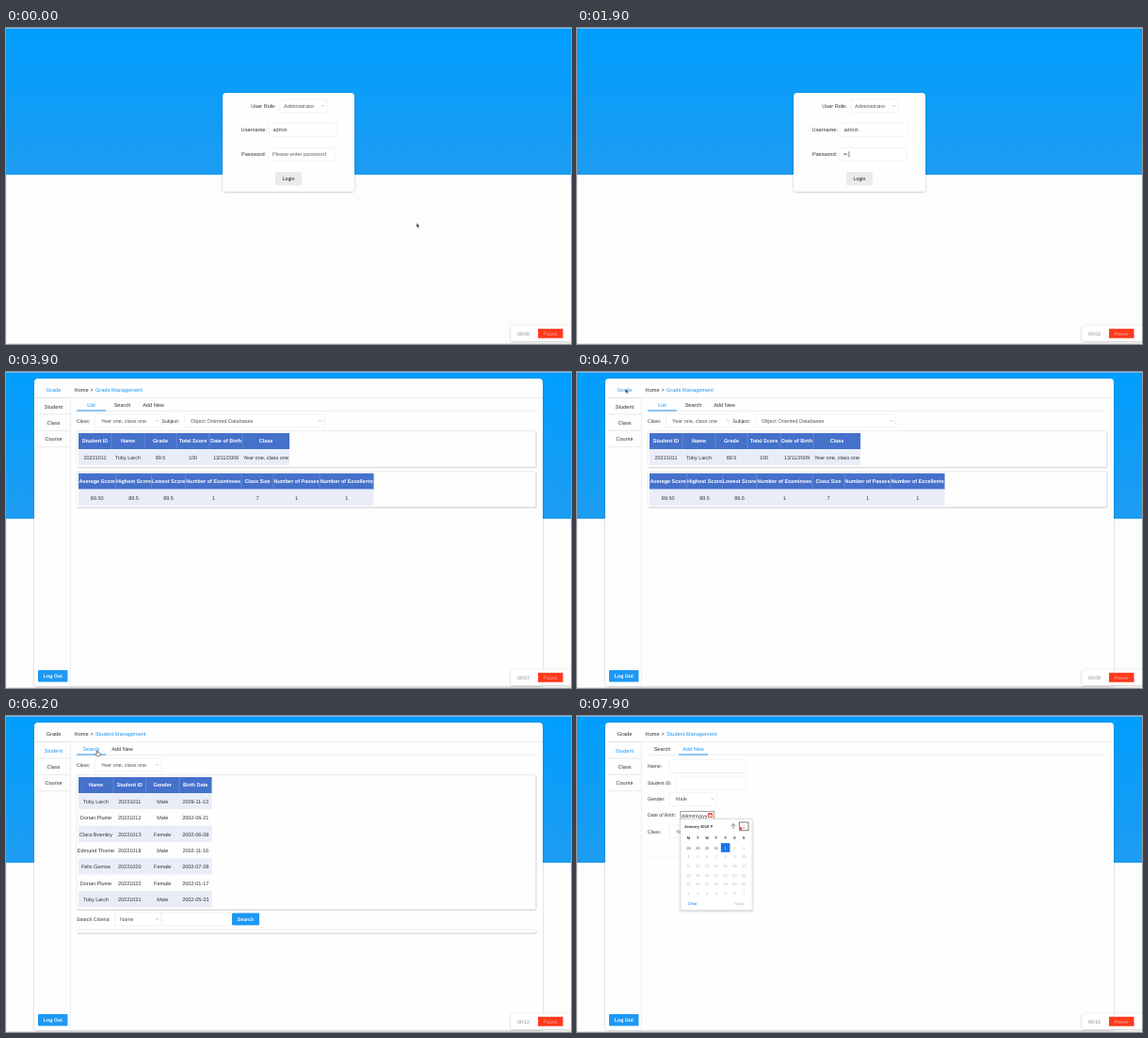
Animation of 600 by 336 pixels, one loop 8 s. Source, as an HTML page:

```html
<!DOCTYPE html>
<html lang="en">
<head>
<meta charset="utf-8">
<title>Grade system walkthrough</title>
<style>
  html, body { margin: 0; width: 100%; height: 100%; overflow: hidden; background: #fdfdfe; }
  svg { display: block; width: 100vw; height: 100vh; }
  text { font-family: "Liberation Sans", Arial, sans-serif; text-rendering: geometricPrecision; white-space: pre; }
</style>
</head>
<body>
<svg id="stage" viewBox="0 0 600 336" preserveAspectRatio="none">
  <defs>
    <linearGradient id="sky" x1="0" y1="0" x2="0" y2="1">
      <stop offset="0" stop-color="#009eff"/>
      <stop offset="1" stop-color="#1d9cf2"/>
    </linearGradient>
    <filter id="soft" x="-10%" y="-20%" width="120%" height="150%">
      <feDropShadow dx="0" dy="0.6" stdDeviation="1" flood-color="#000" flood-opacity="0.25"/>
    </filter>
  </defs>
</svg>
<script>
const LOOP = 8000, STEP = 100;
const BLUE = '#1e98f3', INK = '#333', EDGE = '#ececee', HEAD = '#4571cb', BAND = '#e9edf7';
const stage = document.getElementById('stage');

// ---- drawing helpers ----
function el(parent, tag, attrs, content) {
  const node = document.createElementNS('http://www.w3.org/2000/svg', tag);
  for (const key in attrs) node.setAttribute(key, attrs[key]);
  if (content !== undefined) node.textContent = content;
  return parent.appendChild(node);
}
const group = () => el(stage, 'g', {});
const box = (g, x, y, x2, y2, fill, more) =>
  el(g, 'rect', { x, y, width: x2 - x, height: y2 - y, fill, ...more });
const line = (g, x1, y1, x2, y2, stroke = EDGE, width = 0.7) =>
  el(g, 'line', { x1, y1, x2, y2, stroke, 'stroke-width': width });
const label = (g, x, y, s, more) =>
  el(g, 'text', { x, y, 'font-size': 5.6, fill: INK, ...more }, s);
const centred = (g, x, y, s, more) => label(g, x, y, s, { 'text-anchor': 'middle', ...more });
const field = (g, x, y, x2, y2) => box(g, x, y, x2, y2, '#fff', { rx: 1, stroke: EDGE, 'stroke-width': 0.7 });

function select(g, x, y, x2, value, textX) {
  field(g, x, y, x2, y + 14);
  label(g, textX, y + 9, value, { 'font-size': 5.5, fill: '#555' });
  el(g, 'path', { d: `M${x2 - 6} ${y + 6}l1.6 1.6l1.6 -1.6`, fill: 'none', stroke: '#aaa', 'stroke-width': 0.6 });
}

function button(g, x, y, x2, y2, s) {
  box(g, x, y, x2, y2, BLUE, { rx: 1 });
  centred(g, (x + x2) / 2, (y + y2) / 2 + 1.9, s, { 'font-size': 5.2, fill: '#fff', 'font-weight': 'bold' });
}

function panel(g, y, y2) {
  box(g, 75, y, 563, y2, '#fefefe', { rx: 1.5, stroke: '#e2e2e6', 'stroke-width': 0.6 });
  line(g, 76, y2 + 0.2, 562.5, y2 + 0.2, '#c9c9cf', 0.8);
  line(g, 563, y + 1, 563, y2, '#d5d5da', 0.8);
}

function table(g, top, edges, heads, rows) {
  const last = edges[edges.length - 1], rowH = 17.35;
  const mid = i => (edges[i] + edges[i + 1]) / 2;
  box(g, edges[0], top, last, top + 17, HEAD);
  heads.forEach((s, i) => {
    if (i) line(g, edges[i], top, edges[i], top + 17, '#7f9ddd', 0.5);
    centred(g, mid(i), top + 10.4, s, { 'font-size': 5.5, fill: '#fff', 'font-weight': 'bold' });
  });
  rows.forEach((row, r) => {
    const y = top + 17 + r * rowH;
    box(g, edges[0], y, last, y + rowH, r % 2 ? '#fdfdfe' : BAND);
    row.forEach((s, i) => centred(g, mid(i), y + 10.8, s, { 'font-size': 5.5 }));
  });
}

// tabs: [centre, name], underline spans the active one
function tabs(g, list, active) {
  line(g, 75, 41.3, 563, 41.3, '#e6e6ea');
  list.forEach(([x, s], i) => centred(g, x, 36.6, s, { fill: i === active ? BLUE : INK }));
  const x = list[active][0];
  line(g, x - 15.5, 41, x + 15.5, 41, BLUE, 1);
}

function crumb(g, title, item, y) {
  label(g, 95, 21, title, { fill: BLUE });
  box(g, 36, y - 7, 66, y + 3, '#fefefe');
  centred(g, 50.5, y, item, { fill: BLUE });
}

// ---- backdrop ----
const back = group();
box(back, 0, 0, 600, 336, '#fdfdfe');
box(back, 0, 0, 600, 156, 'url(#sky)');
line(back, 0, 0.3, 600, 0.3, '#a9cfe8', 0.7);
line(back, 0.3, 156, 0.3, 336, '#dcdce0', 0.6);
line(back, 0, 335.6, 600, 335.6, '#dcdce0', 0.8);

// ---- login ----
const login = group();
box(login, 230, 69, 370, 174, '#fefefe', { rx: 4, filter: 'url(#soft)' });
label(login, 260.3, 85, 'User Role:');
select(login, 291, 76, 341, 'Administrator', 295);
label(login, 249.6, 110.3, 'Username:');
field(login, 279, 101.3, 351, 115.3);
label(login, 283.5, 110.3, 'admin', { fill: '#444' });
label(login, 250, 136.3, 'Password:');
field(login, 279, 127.3, 350, 141.3);
const hint = label(login, 283, 136.3, 'Please enter password', { fill: '#666' });
const secret = label(login, 283, 136.3, '', { fill: '#333' });
const caret = box(login, 283, 131.3, 283.6, 137.3, '#333');
box(login, 286, 153, 314, 167.5, '#ebebec', { rx: 1.5 });
centred(login, 300, 162.2, 'Login', { 'font-size': 5.3, fill: '#111' });

// ---- main shell ----
const shell = group();
box(shell, 30, 7, 570, 334, '#fefefe', { rx: 4, filter: 'url(#soft)' });
line(shell, 30, 27.4, 570, 27.4, '#e6e6ea');
line(shell, 68.4, 27, 68.4, 333, '#e6e6ea');
['Grade', 'Student', 'Class', 'Course'].forEach((s, i) => {
  centred(shell, 50.5, 21.2 + i * 17.35, s);
  line(shell, 33, 27.6 + i * 17.35, 68, 27.6 + i * 17.35, '#e0e0e4');
});
label(shell, 72.6, 21, 'Home');
label(shell, 89.6, 21, '>');
button(shell, 34, 317, 65.5, 329.5, 'Log Out');

// ---- grade list ----
const grade = group();
crumb(grade, 'Grade Management', 'Grade', 21.2);
tabs(grade, [[90.5, 'List'], [123.5, 'Search'], [156.5, 'Add New']], 0);
const small = { 'font-size': 5.15 };
label(grade, 75, 54, 'Class:', small);
select(grade, 94.5, 45, 165, 'Year one, class one', 101);
label(grade, 165.5, 54, 'Subject:', small);
select(grade, 190, 45, 338, 'Object Oriented Databases', 196);
panel(grade, 62.5, 101.5);
table(grade, 65, [77, 112, 147, 181, 216, 251, 301],
  ['Student ID', 'Name', 'Grade', 'Total Score', 'Date of Birth', 'Class'],
  [['20221011', 'Toby Larch', '89.5', '100', '13/11/2009', 'Year one, class one']]);
panel(grade, 105.5, 144);
table(grade, 107.7, [77, 116.5, 154.5, 190.5, 250, 284, 333, 390.5],
  ['Average Score', 'Highest Score', 'Lowest Score', 'Number of Examinees', 'Class Size', 'Number of Passes', 'Number of Excellents'],
  [['89.50', '89.5', '89.5', '1', '7', '1', '1']]);

// ---- student list ----
const student = group();
const studentTabs = [[90.5, 'Search'], [123.5, 'Add New']];
crumb(student, 'Student Management', 'Student', 38.55);
tabs(student, studentTabs, 0);
label(student, 75, 54, 'Class:', small);
select(student, 94.5, 45, 165, 'Year one, class one', 101);
panel(student, 62.5, 206);
table(student, 65, [77, 114, 148.5, 184, 218.5],
  ['Name', 'Student ID', 'Gender', 'Birth Date'], [
    ['Toby Larch', '20221011', 'Male', '2009-11-13'],
    ['Dorian Plume', '20221012', 'Male', '2002-06-21'],
    ['Clara Bramley', '20221013', 'Female', '2002-06-08'],
    ['Edmund Thorne', '20221018', 'Male', '2002-11-16'],
    ['Felix Garrow', '20221020', 'Female', '2002-07-28'],
    ['Dorian Plume', '20221022', 'Female', '2002-01-17'],
    ['Toby Larch', '20221031', 'Male', '2002-05-23']
  ]);
label(student, 75, 217.8, 'Search Criteria:', small);
select(student, 115.5, 209, 165, 'Name', 121);
field(student, 165.5, 209, 238, 223);
button(student, 240, 209.5, 269, 222.5, 'Search');
panel(student, 227, 231);

// ---- new student form ----
const form = group();
crumb(form, 'Student Management', 'Student', 38.55);
tabs(form, studentTabs, 1);
['Name:', 'Student ID:', 'Gender:', 'Date of Birth:', 'Class:'].forEach((s, i) =>
  label(form, 75, 55.4 + i * 17.35, s, small));
field(form, 98, 46.5, 179, 60.5);
field(form, 105, 64, 179, 78);
select(form, 98.5, 81.3, 148.5, 'Male', 105);
box(form, 110, 101.3, 145.5, 110, '#fff', { stroke: '#777', 'stroke-width': 0.7 });
label(form, 111.3, 107.5, 'dd/mm/yyyy', { 'font-size': 5.1 });
box(form, 139.6, 103.6, 143.4, 107.6, '#fff', { stroke: '#e8402c', 'stroke-width': 0.8 });
line(form, 139.6, 104.3, 143.4, 104.3, '#e8402c', 1.2);
select(form, 98, 116, 168, 'Year one, class one', 105);
line(form, 75, 149, 180, 149);

// ---- date picker ----
const picker = group();
box(picker, 110, 109.5, 186, 206.5, '#fff', { stroke: '#d2d2d6', 'stroke-width': 0.6, filter: 'url(#soft)' });
label(picker, 113.8, 118.8, 'January 2010', { 'font-size': 4.2, 'font-weight': 'bold' });
el(picker, 'path', { d: 'M141.4 116.6h3l-1.5 1.8z', fill: INK });
el(picker, 'path', { d: 'M166 120.2v-5.6m-2.5 2.5l2.5 -2.5l2.5 2.5', fill: 'none', stroke: '#555', 'stroke-width': 0.7 });
box(picker, 172.3, 113, 182, 121.8, '#fff', { stroke: '#444', 'stroke-width': 0.7 });
el(picker, 'path', { d: 'M177.2 114.8v5.4m-2.4 -2.4l2.4 2.4l2.4 -2.4', fill: 'none', stroke: '#bbb', 'stroke-width': 0.6 });
const dayX = i => 118.5 + (i % 7) * 9.78;
[...'MTWTFSS'].forEach((s, i) => centred(picker, dayX(i), 131.3, s, { 'font-size': 4, 'font-weight': 'bold' }));
box(picker, 152.8, 135.2, 162.4, 144.8, '#1a73e8');
for (let i = 0; i < 42; i++) {
  const day = i < 4 ? 28 + i : (i - 4) % 31 + 1;
  const fill = i < 4 ? '#555' : i === 4 ? '#fff' : '#b9b9bd';
  centred(picker, dayX(i), 141.5 + Math.floor(i / 7) * 9.72, day, { 'font-size': 4.1, fill });
}
label(picker, 117.5, 200.9, 'Clear', { 'font-size': 4.3, fill: '#1a73e8' });
label(picker, 178, 200.9, 'Today', { 'font-size': 4.3, fill: '#bbb', 'text-anchor': 'end' });

// ---- recorder bar ----
const bar = group();
box(bar, 536, 316.5, 603, 333, '#fefefe', { rx: 1, filter: 'url(#soft)' });
const clock = label(bar, 543, 326.8, '00:00', { 'font-size': 5.2, fill: '#888' });
box(bar, 565, 319.8, 591.5, 329.8, '#ff3a1c');
centred(bar, 578, 326.5, 'Pause', { 'font-size': 5.3, fill: '#ffa596' });

// ---- pointers, tip at the origin ----
const shapes = {
  arrow: el(stage, 'path', { d: 'M0 0v4.6l1.1 -1l0.8 1.8l0.9 -0.4l-0.8 -1.7h1.5z', stroke: '#fff', 'stroke-width': 0.3 }),
  hand: el(stage, 'path', {
    d: 'M-0.6 0.4q0.6 -0.8 1.1 0v2l2.3 0.5q0.7 0.3 0.5 1.1l-0.6 2.2h-3l-1.9 -2.4q0.3 -0.8 1.6 0z',
    fill: '#fff', stroke: '#333', 'stroke-width': 0.6
  }),
  beam: el(stage, 'path', { d: 'M-1 -3h2m-1 0v6m-1 0h2', fill: 'none', stroke: '#333', 'stroke-width': 0.5 })
};

// ---- timeline ----
const scenes = [
  [0, login], [3000, shell], [3400, shell, grade], [5000, shell],
  [5500, shell, student], [6700, shell, form], [7400, shell, form, picker]
];
const layers = [login, shell, grade, student, form, picker];
const path = [
  [0, 436, 207.5], [200, 436, 207.5], [900, 305, 134], [2400, 305, 134], [2700, 301.5, 160.5],
  [3000, 301.5, 160.5], [3300, 52, 20], [3400, 52, 20], [3700, 150, 51], [4300, 150, 51],
  [4800, 40, 14], [5200, 59.5, 38.5], [5500, 59.5, 38.5], [6000, 97, 36.5], [6300, 97, 36.5],
  [6600, 126, 36], [6800, 126, 36], [7300, 141, 106], [7400, 141, 106], [7800, 172.8, 117], [8000, 172.8, 117]
];
const looks = [
  [0, 'arrow'], [800, 'beam'], [1500, ''], [2400, 'beam'], [2500, 'arrow'], [3000, 'arrow', '#d8301c'],
  [3100, 'arrow'], [3300, 'hand'], [3500, 'arrow'], [3700, ''], [4300, 'arrow'], [5200, 'hand'],
  [5600, 'arrow'], [6000, 'hand'], [6900, 'arrow'], [7600, 'arrow', '#d8301c']
];
const keys = [1500, 1700, 2000, 2100, 2200, 2300];

const current = (list, t) => list.filter(row => row[0] <= t).pop();
const show = (node, on) => { node.style.display = on ? '' : 'none'; };

function pointerAt(t) {
  const i = path.findIndex(p => p[0] > t);
  const [t0, x0, y0] = path[i - 1], [t1, x1, y1] = path[i];
  const u = (t - t0) / (t1 - t0), k = u * u * (3 - 2 * u);
  return [x0 + (x1 - x0) * k, y0 + (y1 - y0) * k];
}

function draw(time) {
  let t = Math.floor(time % LOOP / STEP) * STEP;
  if (t > 2700 && t < 3000) t = 2700;   // page load pause

  const visible = current(scenes, t);
  layers.forEach(layer => show(layer, visible.includes(layer)));

  const typed = keys.filter(k => k <= t).length;
  show(hint, !typed);
  secret.textContent = '•'.repeat(typed);
  show(caret, t >= 1000 && t < 2700);
  caret.setAttribute('x', 283.2 + typed * 1.96 + (typed ? 1.5 : 0));

  const seconds = Math.floor(t * 0.00192 + 0.1);
  clock.textContent = '00:' + String(seconds).padStart(2, '0');

  const [, look, tint = '#333'] = current(looks, t);
  const [x, y] = pointerAt(t);
  for (const name in shapes) {
    show(shapes[name], name === look);
    shapes[name].setAttribute('transform', `translate(${x} ${y})`);
  }
  shapes.arrow.setAttribute('fill', tint);
}

const start = performance.now();
function tick() {
  draw(performance.now() - start);
  requestAnimationFrame(tick);
}
tick();
</script>
</body>
</html>
```
